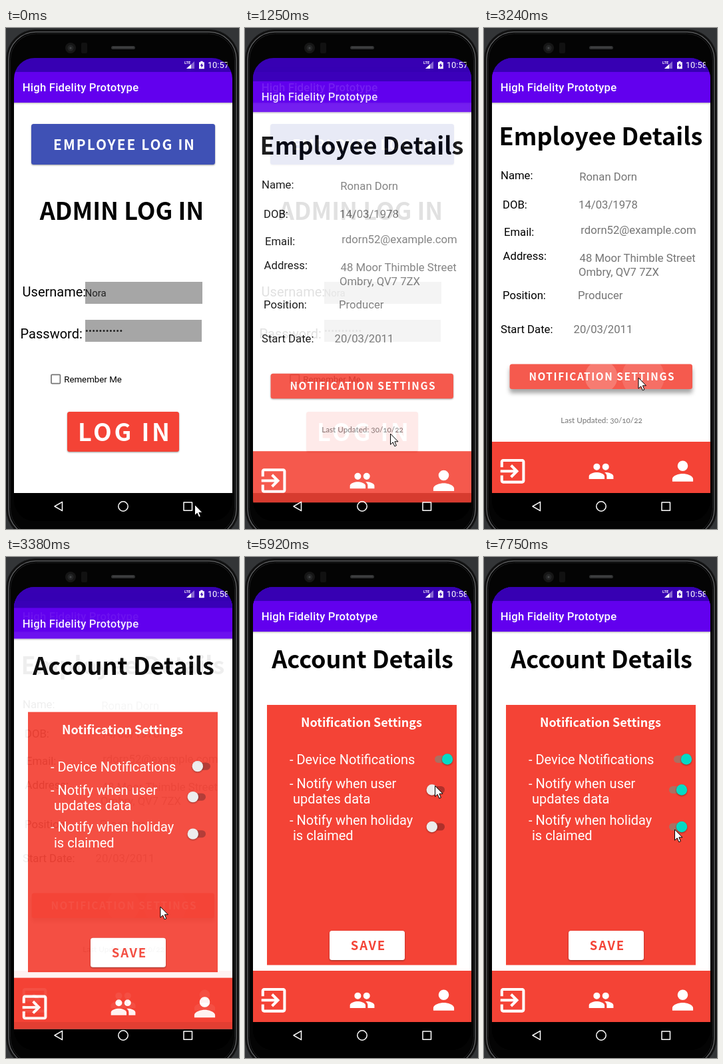
Animation of 350 by 752 pixels, one loop 8 s. Source, as an HTML page:

```html
<!DOCTYPE html>
<html lang="en">
<head>
<meta charset="utf-8">
<title>App prototype</title>
<style>
  html, body { margin: 0; width: 100%; height: 100%; overflow: hidden; background: #333537; }
  svg { display: block; width: 350px; height: 752px; }
  text { font-family: Roboto, "Noto Sans", sans-serif; }
  .bold { font-family: "Noto Sans CJK JP", "Noto Sans CJK SC", "Noto Sans CJK", "Open Sans", sans-serif; font-weight: 700; text-anchor: middle; }
  .lato { font-family: Lato, "Open Sans", sans-serif; font-variant-numeric: oldstyle-nums; text-anchor: middle; }
  .raised { filter: drop-shadow(0 1px 1px rgba(0,0,0,.4)); }
</style>
</head>
<body>
<svg id="stage" viewBox="0 0 350 752" xmlns="http://www.w3.org/2000/svg"></svg>
<script>
const LOOP = 8000;
const RED = '#f44336', GREY = '#757575';

// Markup helpers
const text = (x, y, size, fill, str, extra = '') =>
  `<text x="${x}" y="${y}" font-size="${size}" fill="${fill}" ${extra}>${str}</text>`;
const heading = (x, y, size, fill, str) => text(x, y, size, fill, str, 'class="bold"');
const caption = (x, y, size, fill, str) =>
  text(x + size * .05, y, size, fill, str, `class="bold" letter-spacing="${(size * .0993).toFixed(2)}"`);
const rect = (x, y, w, h, fill, extra = '') =>
  `<rect x="${x}" y="${y}" width="${w}" height="${h}" fill="${fill}" ${extra}/>`;
const button = (x, y, w, h, fill, id = '') =>
  rect(x, y, w, h, fill, `rx="3.5" class="raised" ${id && `id="${id}"`}`);
const icon = (x, y, scale, d) =>
  `<path transform="translate(${x} ${y}) scale(${scale})" fill="#fff" d="${d}"/>`;
const clip = (id, x, y, w, h, r) => `<clipPath id="${id}">${rect(x, y, w, h, '#000', `rx="${r}"`)}</clipPath>`;

const windowGroup = (id, body) => `<g id="${id}">
  ${rect(12, 111, 328, 587, '#fff')}
  ${rect(12, 112, 328, 3, 'url(#barShadow)')}
  ${rect(12, 45, 328, 21, '#3700b3')}
  ${rect(12, 66, 328, 46, '#6200ee')}
  ${rect(12, 698, 328, 54, '#000')}
  ${text(24.7, 95.2, 16.7, '#fff', 'High Fidelity Prototype', 'font-weight="500" letter-spacing=".21"')}
  ${body}</g>`;

const tabBar = rect(12, 621, 328, 77, RED) +
  icon(18.6, 640.8, 2.04, 'M10.09 15.59L11.5 17l5-5-5-5-1.41 1.41L12.67 11H3v2h9.67zM19 3H5c-1.1 0-2 .9-2 2v4h2V5h14v14H5v-4H3v4c0 1.1.9 2 2 2h14c1.1 0 2-.9 2-2V5c0-1.1-.9-2-2-2z') +
  icon(156, 645.3, 1.67, 'M16 11a3 3 0 1 0 0-6 3 3 0 0 0 0 6zM8 11a3 3 0 1 0 0-6 3 3 0 0 0 0 6zm0 2c-2.33 0-7 1.17-7 3.5V19h14v-2.5C15 14.17 10.33 13 8 13zm8 0l-.97.05C16.19 13.89 17 15.02 17 16.5V19h6v-2.5c0-2.33-4.67-3.5-7-3.5z') +
  icon(275.1, 641.7, 1.95, 'M12 12a4 4 0 1 0 0-8 4 4 0 0 0 0 8zm0 2c-2.67 0-8 1.34-8 4v2h16v-2c0-2.66-5.33-4-8-4z');

const dots = Array.from({ length: 11 }, (_, i) =>
  `<circle cx="${121.3 + i * 5.15}" cy="454.5" r="1.5" fill="#222"/>`).join('');

const loginScreen = windowGroup('login', `
  ${button(38, 144, 276, 61, '#3f51b5')}
  ${caption(177, 183, 20.8, '#fff', 'EMPLOYEE LOG IN')}
  ${heading(174, 288, 36, '#000', 'ADMIN LOG IN')}
  ${rect(119, 381, 176, 33, '#a6a6a6')}${rect(119, 438, 175, 33, '#a6a6a6')}
  ${text(24.6, 402.5, 20, '#000', 'Username:')}
  ${text(21.6, 466, 20, '#000', 'Password:')}
  ${text(118.5, 403, 15, '#222', 'Nora')}${dots}
  <rect x="68" y="520.3" width="13.4" height="13.4" rx="1.2" fill="none" stroke="#757575" stroke-width="1.7"/>
  ${text(87.2, 532, 13.3, '#000', 'Remember Me')}
  ${button(92, 576, 168, 60, RED)}
  <g clip-path="url(#loginClip)"><circle id="loginRipple" cx="219" cy="609" fill="#fff"/></g>
  ${caption(177, 620, 36, '#fff', 'LOG IN')}`);

const labels = [[25, 227, 'Name:'], [28, 271, 'DOB:'], [30, 312, 'Email:'], [28.6, 348, 'Address:'],
  [28, 406.5, 'Position:'], [25, 457.5, 'Start Date:']];
const values = [[143.3, 229, 'Ronan Dorn'], [142, 271, '14/03/1978'], [145.3, 309, 'rdorn52@example.com'],
  [143.5, 350.5, '48 Moor Thimble Street'], [142, 371.5, 'Ombry, QV7 7ZX'],
  [141, 406.5, 'Producer'], [134.5, 457.5, '20/03/2011']];
const rows = (list, fill) => list.map(([x, y, str]) => text(x, y, 16.7, fill, str)).join('');

const detailsScreen = windowGroup('details', `
  ${heading(175.5, 176, 36, '#000', 'Employee Details')}
  ${rows(labels, '#000')}${rows(values, GREY)}
  ${button(38.6, 504.5, 274.4, 37.5, RED, 'settings')}
  <g clip-path="url(#settingsClip)">
    ${rect(38, 504, 276, 39, '#fff', 'id="settingsTint"')}
    <circle id="rippleA" cx="176" cy="523.5" fill="#fff"/>
    <circle id="rippleB" cx="239" cy="523.5" fill="#fff"/>
  </g>
  ${caption(176.5, 529, 15.4, '#fff', 'NOTIFICATION SETTINGS')}
  ${text(176.5, 593, 11.7, GREY, 'Last Updated: 30/10/22', 'class="lato"')}
  ${tabBar}`);

// Each switch: centre, press time, halo radius
const switches = [
  { x: 296, y: 303.5, at: 4860, halo: 16 },
  { x: 289, y: 349.5, at: 6100, halo: 16 },
  { x: 289, y: 405, at: 7250, halo: 9 }
];
const switchMarkup = switches.map(({ x, y }, i) => `
  ${rect(x - 11, y - 5.5, 22, 11, '#000', `rx="5.5" id="track${i}"`)}
  <circle id="halo${i}" cy="${y}" fill="#fff"/>
  <circle id="thumb${i}" cy="${y}" r="8.2" class="raised"/>`).join('');

const accountScreen = windowGroup('account', `
  ${heading(176.5, 166.5, 36, '#000', 'Account Details')}
  ${rect(33, 222, 285, 390.5, RED)}
  ${heading(175, 255, 18, '#fff', 'Notification Settings')}
  ${text(67, 311, 20, '#fff', '- Device Notifications')}
  ${text(67, 346.5, 20, '#fff', '- Notify when user')}
  ${text(72, 369.7, 20, '#fff', 'updates data')}
  ${text(67, 401.7, 20, '#fff', '- Notify when holiday')}
  ${text(72, 425, 20, '#fff', 'is claimed')}
  ${switchMarkup}
  ${button(127, 561, 113, 44, '#fff')}
  ${caption(184.5, 590, 18.5, RED, 'SAVE')}
  ${tabBar}`);

const phone = `
  ${rect(0, 0, 350, 752, '#333537')}
  ${rect(.5, 2.5, 349, 764, '#101010', 'rx="44" stroke="#1b1c1d" stroke-width="1"')}
  ${rect(4, 6, 342, 757, '#000', 'rx="41" stroke="#58595b" stroke-width="1.6"')}
  ${rect(6.5, 8.5, 337, 752, '#040404', 'rx="39" stroke="#202122" stroke-width="1"')}
  <circle cx="97" cy="30" r="8" fill="#161616"/><circle cx="97" cy="30" r="4.5" fill="#242526"/>
  <circle cx="97" cy="30" r="1.6" fill="#454749"/>
  ${rect(113, 22, 9, 16, '#111', 'rx="2"')}
  ${rect(158, 27, 36, 5, '#2f3031', 'rx="2.5"')}${rect(160, 28.5, 32, 1.2, '#4b4c4d')}`;

const systemIcons = `
  ${text(268, 54, 5.6, '#fff', 'LTE', 'font-weight="700"')}
  <path d="M283 50V61H271Z" fill="#fff" opacity=".4"/><path d="M278 54.6V61H271Z" fill="#fff"/>
  <path d="M290 51.2h2.2v-1.4h3.4v1.4h2.2v10h-7.8z" fill="#fff"/>
  <path d="M294.6 52.6l-3 4h1.9v3.2l3-4.2h-1.9z" fill="#3700b3"/>
  <g clip-path="url(#clockClip)">${text(302.8, 60, 12.9, '#fff', '', 'id="clock"')}</g>
  <g fill="none" stroke="#fff" stroke-width="1.5" stroke-linejoin="round">
    <path d="M73 718L84.5 711.3V724.7Z"/><circle cx="176" cy="718" r="7.2"/>
    <rect x="267" y="712" width="12.5" height="12.2"/>
  </g>`;

document.getElementById('stage').innerHTML = `
  <defs>
    <linearGradient id="barShadow" x2="0" y2="1">
      <stop offset="0" stop-color="#000" stop-opacity=".25"/><stop offset="1" stop-color="#000" stop-opacity="0"/>
    </linearGradient>
    ${clip('screenClip', 12, 45, 328, 695, 31)}
    ${clip('loginClip', 92, 576, 168, 60, 3.5)}
    ${clip('settingsClip', 38.6, 504.5, 274.4, 37.5, 3.5)}
    ${clip('clockClip', 300, 46, 32.6, 20, 0)}
  </defs>
  ${phone}
  <g clip-path="url(#screenClip)">${loginScreen}${detailsScreen}${accountScreen}</g>
  ${systemIcons}
  <path id="cursor" d="M0 0V16.2L3.7 12.8L6.3 18.8L8.9 17.7L6.4 11.8H11.5Z" fill="#fff" stroke="#000" stroke-width="1" stroke-linejoin="round"/>`;

// Cursor stops: time, x, y
const path = [
  [30, 283.5, 715.5], [400, 196, 490], [520, 176, 445], [780, 218.5, 609],
  [2420, 218.5, 609], [3080, 232, 525], [4010, 231.5, 525], [4480, 311, 303], [4690, 301.5, 295.5],
  [5200, 301.5, 295.5], [5650, 286.5, 333], [5910, 285.5, 343.5],
  [6460, 285.5, 343.5], [6870, 286, 392], [7080, 286.5, 409]
];

const $ = Object.fromEntries([...document.querySelectorAll('[id]')].map(el => [el.id, el]));
const set = (el, attrs) => { for (const key in attrs) el.setAttribute(key, attrs[key]); };
const progress = (t, start, length) => Math.min(1, Math.max(0, (t - start) / length));
const smooth = p => p * p * (3 - 2 * p);
const mix = (a, b, p) => a + (b - a) * p;

function cursorAt(t) {
  const i = path.findIndex(stop => stop[0] > t);
  if (i === 0) return path[0].slice(1);
  if (i < 0) return path[path.length - 1].slice(1);
  const [t0, x0, y0] = path[i - 1], [t1, x1, y1] = path[i];
  const p = smooth((t - t0) / (t1 - t0));
  return [mix(x0, x1, p), mix(y0, y1, p)];
}

// New windows rise by 8% of the screen while fading in
function openWindow(el, t, start) {
  const rise = 55 * (1 - progress(t, start, 350)) ** 5;
  const alpha = 1 - (1 - progress(t, start, 200)) ** 4;
  set(el, { transform: `translate(0 ${rise.toFixed(2)})`, opacity: alpha, display: t < start ? 'none' : 'inline' });
}

function ripple(el, t, start, from, to, length, alpha) {
  const p = progress(t, start, length);
  set(el, { r: mix(from, to, 1 - (1 - p) ** 2), opacity: t < start ? 0 : alpha });
}

function drawSwitch({ x, at, halo }, i, t) {
  const p = smooth(progress(t, at + 110, 230));
  const thumbX = mix(x - 8.2, x + 8, p);
  const channel = (a, b) => Math.round(mix(a, b, p));
  const fade = progress(t, at, 100) * (1 - progress(t, at + 260, 200));
  set($['thumb' + i], { cx: thumbX, fill: `rgb(${channel(236, 3)},${channel(236, 218)},${channel(236, 197)})` });
  set($['track' + i], { fill: `rgb(${channel(174, 170)},${channel(48, 112)},${channel(42, 98)})` });
  set($['halo' + i], { cx: thumbX, r: halo, opacity: fade * .16 });
}

function draw(t) {
  openWindow($.details, t, 1168);
  openWindow($.account, t, 3283);

  ripple($.loginRipple, t, 890, 10, 150, 300, .2 * (1 - progress(t, 1100, 250)));

  const press = progress(t, 3140, 80);
  set($.settingsTint, { opacity: press * .12 });
  ripple($.rippleA, t, 3140, 8, 24.5, 100, .2);
  ripple($.rippleB, t, 3140, 8, 32, 100, .13);
  $.settings.style.filter =
    `drop-shadow(0 ${mix(1, 6, press)}px ${mix(1, 3, press)}px rgba(0,0,0,${mix(.4, .35, press)}))`;

  switches.forEach((item, i) => drawSwitch(item, i, t));
  $.clock.textContent = t < 2260 ? '10:57' : '10:58';
  set($.cursor, { transform: `translate(${cursorAt(t).map(v => v.toFixed(1)).join(' ')})` });
}

const began = performance.now();
function tick() {
  draw((performance.now() - began) % LOOP);
  requestAnimationFrame(tick);
}
draw(0);
requestAnimationFrame(tick);
</script>
</body>
</html>
```
